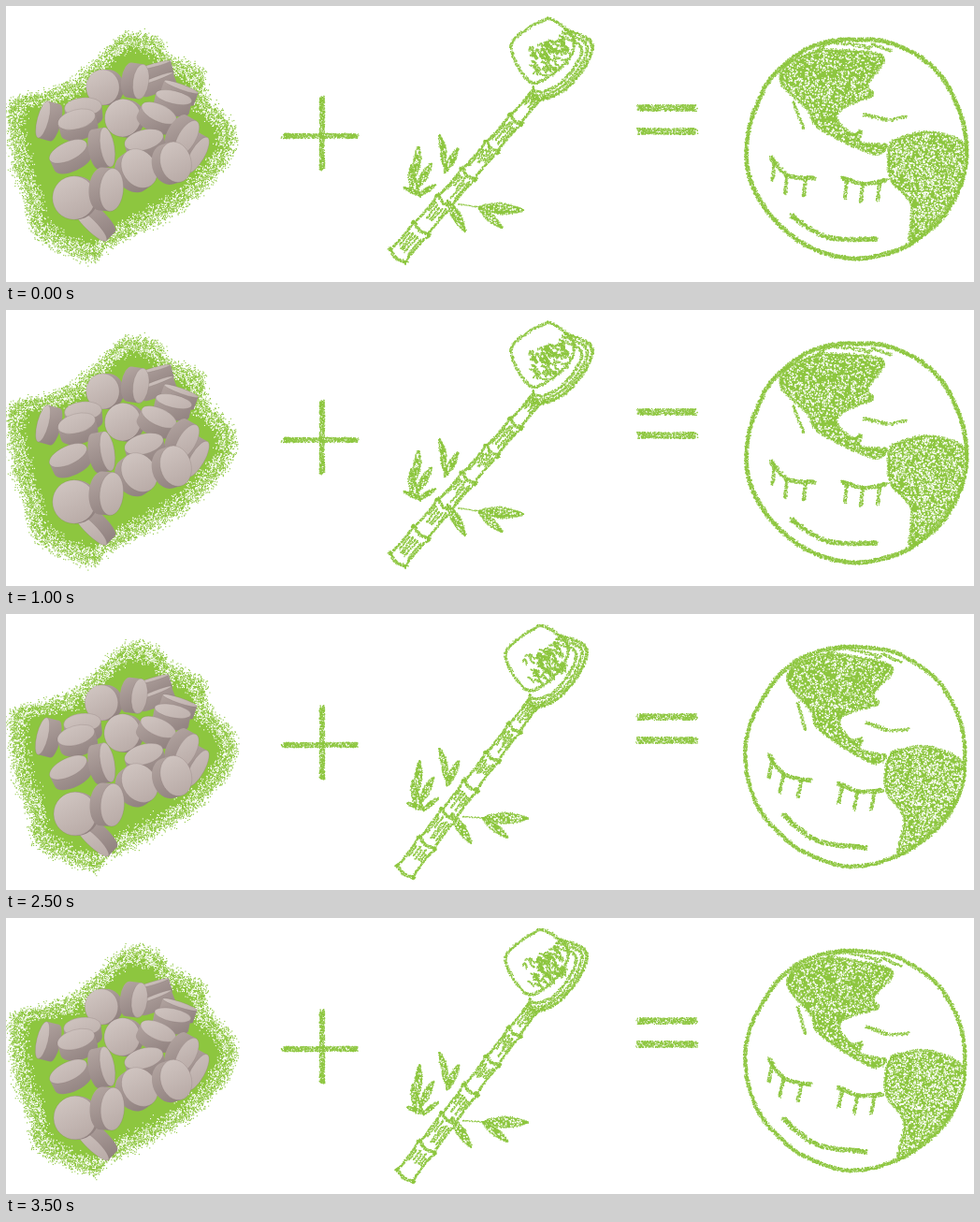
Write an HTML page with a canvas that moves like this. It is 1035 px wide and 295 px high and loops after 4000 ms.

```html
<!DOCTYPE html>
<html lang="en">
<head>
<meta charset="utf-8">
<title>Tablets + bamboo brush = happy planet</title>
<style>
  html, body { margin: 0; width: 100%; height: 100%; overflow: hidden; background: #fff; }
  canvas { position: absolute; left: 0; top: 0; }
  #b { animation: flip 1s step-end infinite; }
  @keyframes flip { 0% { opacity: 0 } 50% { opacity: 1 } 100% { opacity: 1 } }
</style>
</head>
<body>
<canvas id="a" width="1035" height="295"></canvas>
<canvas id="b" width="1035" height="295"></canvas>
<script>
const GREEN = '#8dc63f';
const RAD = Math.PI / 180;
let g, seed;

function rnd() {
  seed = (seed * 1664525 + 1013904223) >>> 0;
  return seed / 4294967296;
}
const spread = w => (rnd() - .5) * w;
const bell = w => (rnd() + rnd() + rnd() - 1.5) * w;

// One coordinate of a Catmull-Rom curve
function blend(p, q, r, s, t) {
  const cubic = 3 * (q - r) + s - p;
  const square = 2 * p - 5 * q + 4 * r - s;
  return q + .5 * t * (r - p + t * (square + t * cubic));
}

// Curve through the points, about one sample per pixel
function spline(pts, closed) {
  const n = pts.length, out = [];
  const at = i => closed ? pts[(i + n) % n] : pts[Math.max(0, Math.min(n - 1, i))];
  for (let i = 0; i < (closed ? n : n - 1); i++) {
    const p = at(i - 1), q = at(i), r = at(i + 1), s = at(i + 2);
    const steps = Math.ceil(Math.hypot(r[0] - q[0], r[1] - q[1])) || 1;
    for (let k = 0; k < steps; k++) {
      const t = k / steps;
      out.push([blend(p[0], q[0], r[0], s[0], t), blend(p[1], q[1], r[1], s[1], t)]);
    }
  }
  return out;
}

function dot(x, y, size = 1.2) {
  g.fillRect(x - size / 2, y - size / 2, size, size);
}

function chalk(pts, w, dense = 1.1, closed = false) {
  g.fillStyle = GREEN;
  for (const [x, y] of spline(pts, closed))
    for (let k = 0; k < w * dense; k++) dot(x + spread(w), y + spread(w));
}

function trace(pts) {
  g.beginPath();
  for (const [x, y] of spline(pts, true)) g.lineTo(x, y);
  g.closePath();
}

// Solid area broken up by white paper grain
function grain(pts, holes, edge) {
  g.save();
  trace(pts);
  g.fillStyle = GREEN;
  g.fill();
  g.clip();
  g.fillStyle = '#fff';
  const xs = pts.map(p => p[0]), ys = pts.map(p => p[1]);
  const x = Math.min(...xs), y = Math.min(...ys);
  const w = Math.max(...xs) - x, h = Math.max(...ys) - y;
  for (let k = 0; k < w * h * holes; k++) dot(x + rnd() * w, y + rnd() * h, .8 + rnd() * .9);
  g.restore();
  chalk(pts, edge, .5, true);
}

function pose(dx, dy, turn, cx, cy, draw) {
  g.save();
  g.translate(cx + dx, cy + dy);
  g.rotate(turn);
  g.translate(-cx, -cy);
  draw();
  g.restore();
}

function patch() {
  const edge = [[127, 40], [158, 44], [170, 60], [203, 76], [206, 100], [233, 130], [230, 160],
    [188, 206], [112, 248], [90, 263], [40, 240], [31, 210], [16, 165], [13, 108], [48, 98], [82, 82]];
  trace(edge);
  g.fillStyle = GREEN;
  g.fill();
  for (const [x, y] of spline(edge, true)) {
    const a = Math.atan2(y - 150, x - 120), c = Math.cos(a), s = Math.sin(a);
    for (let k = 0; k < 13; k++) {
      const r = bell(11), side = spread(5);
      g.fillStyle = r > 0 ? GREEN : '#fff';
      if (r > 0 || k < 7) dot(x + c * r - s * side, y + s * r + c * side, 1.1);
    }
  }
}

// Centre, direction the rim faces in degrees, how far the face is open
const PILLS = [[160, 70, 75, .1], [163, 84, 70, .1], [185, 93, 110, .15], [46, 123, 15, .3],
  [95, 229, -45, .25], [106, 87, 0, .93], [138, 80, 188, .45], [127, 120, 10, .95],
  [83, 114, 85, .5], [77, 127, 75, .5], [178, 104, 103, .35], [161, 120, 115, .45],
  [199, 156, 210, .35], [188, 138, 210, .45], [149, 149, 75, .5], [69, 161, 65, .45],
  [102, 152, 170, .35], [139, 176, 145, .8], [177, 168, 165, .75], [74, 205, 0, .98], [107, 196, 185, .55]];

function pill([x, y, turn, open]) {
  const r = 16 + y / 28, rx = r * open, depth = 14 * Math.sqrt(1 - open * open);
  // The path is turned, the light is not
  const part = (top, low, path) => {
    g.beginPath();
    g.rotate(turn * RAD);
    path();
    g.rotate(-turn * RAD);
    const light = g.createLinearGradient(-r / 2, -r, r / 2, r);
    light.addColorStop(0, top);
    light.addColorStop(1, low);
    g.fillStyle = light;
    g.fill();
  };
  g.save();
  g.translate(x, y);
  part('#b3a5a1', '#8f807e', () => {
    g.ellipse(depth / 2, 0, rx, r, 0, 0, 7);
    g.rect(-depth / 2, -r, depth, r * 2);
  });
  part('#d0c5c1', '#b8aaa6', () => g.ellipse(-depth / 2, 0, rx, r, 0, 0, 7));
  g.strokeStyle = 'rgba(120,104,102,.28)';
  g.lineWidth = .8;
  g.stroke();
  g.restore();
}

function leaf(x, y, turn, len) {
  g.save();
  g.translate(x, y);
  g.rotate(turn * RAD);
  grain([[0, 0], [len / 2, len * .12], [len, 0], [len / 2, -len * .12]], .2, 1.6);
  g.restore();
}

function handle() {
  const step = 38.7;
  g.save();
  g.translate(570, 92);
  g.rotate(Math.atan2(176, -152));
  for (let i = 0; i < 6; i++) {
    const a = i * step, b = a + step, h = 6.5 + a * .017;
    chalk([[b - 2, -h - 2], [b + 2, 0], [b - 2, h + 2]], 3.2, 1);
    for (const s of [-1, 1])
      chalk([[a, s * (h + 2)], [a + 6, s * h], [b - 5, s * h], [b, s * (h + 2)]], 2.3, 1);
    for (let k = -2; k <= 2; k++) {
      const v = k * h * .35, from = a + 4 + rnd() * 8;
      chalk([[from, v], [from + 10 + rnd() * 15, v + spread(2)]], 1.9, .9);
    }
  }
  g.restore();
}

function brush() {
  handle();
  // Head: one contour repeated inwards
  const head = [[598, 25], [625, 38], [622, 59], [600, 87], [577, 99], [562, 98]];
  for (const k of [1, .91, .8])
    chalk(head.map(([x, y]) => [570 + (x - 570) * k, 60 + (y - 60) * k]), 1 + 2.4 * k, .9);
  // Bristles
  chalk([[563, 82], [541, 50], [546, 33], [571, 17], [585, 15], [607, 36], [597, 62]], 3, .9, true);
  for (let k = 0; k < 70; k++) {
    const u = rnd(), v = rnd();
    const x = 555 + u * 38 + v * 9, y = 43 - u * 9 + v * (36 - u * 8);
    chalk([[x, y], [x + 3 + spread(3), y + spread(6)], [x + 5 + spread(5), y + 4 + spread(5)]], 1.8, .9);
  }
  // Leaves
  leaf(470, 162, -105, 25);
  leaf(469, 178, -61, 29);
  leaf(472, 176, -111, 19);
  leaf(438, 181, -84, 31);
  leaf(434, 196, -92, 26);
  leaf(439, 195, -59, 31);
  leaf(445, 202, -158, 21);
  leaf(442, 202, -33, 20);
  leaf(472, 208, 60, 38);
  leaf(506, 216, 41, 32);
  leaf(506, 215, 4, 47);
  chalk([[436, 180], [443, 204]], 2);
  chalk([[484, 212], [506, 215]], 1, .35);
}

function eye(from, mid, to) {
  const lid = spline([from, mid, to]);
  chalk([from, mid, to], 4.2);
  for (const t of [.15, .46, .8]) {
    const [x, y] = lid[Math.floor(lid.length * t)];
    chalk([[x, y], [x - 2, y + 20]], 3.6);
  }
}

function planet(line) {
  const ring = Array.from({ length: 28 }, (_, i) => {
    const a = i * Math.PI / 14, r = 117.5 + Math.sin(a * 5) * .9 + spread(1.6);
    return [909.5 + r * Math.cos(a), 152 + r * Math.sin(a)];
  });
  chalk(ring, line, 1.2, true);
  grain([[832, 66], [850, 54], [880, 47], [937, 54], [921, 84], [926, 95], [896, 108], [888, 121],
    [903, 136], [914, 134], [914, 146], [941, 149], [931, 158], [900, 147], [867, 128], [857, 110], [830, 84]], .2, 3);
  grain([[945, 150], [960, 140], [990, 135], [1026, 151], [1016, 200], [969, 252], [968, 212],
    [946, 185]], .27, 3);
  // Coast and islands
  chalk([[868, 48], [885, 39], [925, 45]], 4, .6);
  chalk([[926, 41], [947, 48]], 3, .7);
  chalk([[842, 103], [853, 131]], 3, .7);
  chalk([[918, 116], [942, 122]], 4, .8);
  chalk([[946, 122], [963, 118]], 3.4, .7);
  // Face
  eye([818, 162], [836, 181], [865, 184]);
  eye([894, 184], [918, 190], [942, 186]);
  chalk([[840, 224], [878, 247], [931, 249]], 4.8);
}

function signs(dy) {
  chalk([[297, 139 + dy], [375, 139 + dy]], 5.5);
  chalk([[338, 98 + dy * 2], [338, 174 + dy * 2]], 5.5);
  for (const y of [109, 134]) chalk([[677, y + dy], [737, y + dy]], 7);
}

function paint(id, k) {
  g = document.getElementById(id).getContext('2d');
  seed = 42 + k * 729;
  g.fillStyle = '#fff';
  g.fillRect(0, 0, 1035, 295);
  pose(2 * k, 2 * k, 0, 0, 0, patch);
  pose(0, 7.5 * k, -.022 * k, 120, 150, () => PILLS.forEach(pill));
  signs(k);
  pose(k, 3.5 * k, -.061 * k, 501, 157, brush);
  pose(-k, -k, .11 * k, 909, 152, () => planet(4.2 - .4 * k));
}

paint('a', 0);
paint('b', 1);
</script>
</body>
</html>
```
